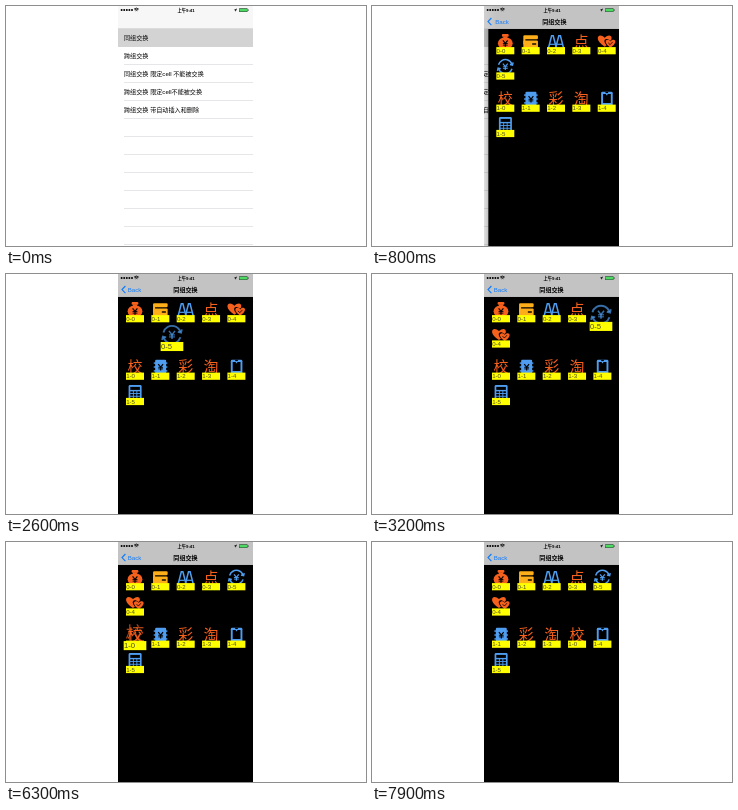
These frames come from a looping animation (360x240 px, 8 s). An HTML page with a canvas:

```html
<!DOCTYPE html>
<html lang="zh-CN">
<head>
<meta charset="utf-8">
<style>
html, body { margin: 0; width: 100%; height: 100%; overflow: hidden; background: #fff; }
canvas { display: block; width: 360px; height: 240px; }
</style>
</head>
<body>
<canvas id="stage"></canvas>
<script>
const LOOP = 8000, LEFT = 112, WIDTH = 135, NAV = 23, CELL = 18;
const ORANGE = '#f5601c', AMBER = '#fdae18', BLUE = '#4f9df0', TINT = '#0a7aff';
const FONT = '"Liberation Sans", "Noto Sans CJK SC", "Noto Sans CJK", sans-serif';
const ROWS = ['同组交换', '跨组交换', '同组交换 限定cell 不能被交换',
              '跨组交换 限定cell不能被交换', '跨组交换 带自动插入和删除'];

const canvas = document.getElementById('stage');
const c = canvas.getContext('2d');
const ratio = window.devicePixelRatio || 1;
canvas.width = 360 * ratio;
canvas.height = 240 * ratio;

const clamp = v => Math.max(0, Math.min(1, v));
const mix = (a, b, p) => a + (b - a) * p;
const ease = (t, start, length) => {
  const p = clamp((t - start) / length);
  return p * p * (3 - 2 * p);
};

function rect(x, y, w, h, color) {
  c.fillStyle = color;
  c.fillRect(x, y, w, h);
}
function round(x, y, w, h, r, color) {
  c.fillStyle = color;
  c.beginPath();
  c.roundRect(x, y, w, h, r);
  c.fill();
}
function disc(x, y, r, color) {
  c.fillStyle = color;
  c.beginPath();
  c.arc(x, y, r, 0, 7);
  c.fill();
}
function line(color, width, ...points) {
  c.strokeStyle = color;
  c.lineWidth = width;
  c.beginPath();
  points.forEach(([x, y]) => c.lineTo(x, y));
  c.stroke();
}
function arc(x, y, r, from, to, color, width) {
  c.strokeStyle = color;
  c.lineWidth = width;
  c.beginPath();
  c.arc(x, y, r, from, to);
  c.stroke();
}
function text(value, x, y, size, color, align = 'left', weight = 400) {
  c.font = `${weight} ${size}px ${FONT}`;
  c.textAlign = align;
  c.fillStyle = color;
  c.fillText(value, x, y);
}

// Icons are drawn around their centre, about 15 px wide.
const yen = (x, y, color, s = 1) => {
  line(color, 1.2, [x - 2.4 * s, y - 3 * s], [x, y], [x + 2.4 * s, y - 3 * s]);
  line(color, 1.2, [x, y], [x, y + 3.4 * s]);
  line(color, 0.9, [x - 2.4 * s, y + 0.2], [x + 2.4 * s, y + 0.2]);
  line(color, 0.9, [x - 2.4 * s, y + 1.8 * s], [x + 2.4 * s, y + 1.8 * s]);
};
const glyph = value => () => text(value, 0, 5.6, 15, ORANGE, 'center', 500);
const heart = (x, y, s, color) => {
  c.fillStyle = color;
  c.beginPath();
  c.moveTo(x, y + s);
  c.bezierCurveTo(x - 2 * s, y - 0.3 * s, x - s, y - 1.5 * s, x, y - 0.5 * s);
  c.bezierCurveTo(x + s, y - 1.5 * s, x + 2 * s, y - 0.3 * s, x, y + s);
  c.fill();
};

const icons = {
  bag() {
    round(-3.4, -7.4, 6.8, 2.8, 1, ORANGE);
    rect(-2, -5, 4, 2, ORANGE);
    c.fillStyle = ORANGE;
    c.beginPath();
    c.ellipse(0, 2, 7.4, 6, 0, 0, 7);
    c.fill();
    yen(0, 2, '#000');
  },
  card() {
    round(-7.3, -6, 14.6, 4, 1.2, AMBER);
    round(-7.3, -0.8, 14.6, 8, 1, AMBER);
    rect(-7.3, -3, 2, 6, AMBER);
    rect(1.5, 2, 4, 1.4, '#000');
  },
  letters() {
    for (const x of [-3.6, 3.6]) {
      line(BLUE, 1.5, [x - 4, 7], [x - 0.8, -5.6], [x + 0.8, -5.6], [x + 4, 7]);
      line(BLUE, 1.2, [x - 2.5, 3], [x + 2.5, 3]);
    }
  },
  hearts() {
    heart(-2, -0.5, 6, ORANGE);
    heart(3.5, 2, 5, '#000');
    heart(3.8, 2.2, 4.2, ORANGE);
    line('#000', 0.8, [1.6, 1.6], [3.4, 3.4], [6, 0.6]);
  },
  cycle() {
    arc(0, 0, 7, 3.4, 6.0, BLUE, 1.5);
    arc(0, 0, 7, 0.3, 2.85, BLUE, 1.5);
    line(BLUE, 1.5, [4.6, -2.2], [7.2, -1.6], [7.8, -4.2]);
    line(BLUE, 1.5, [-4.6, 2.2], [-7.2, 1.6], [-7.8, 4.2]);
    yen(0, 0, BLUE);
  },
  book() {
    round(-5.2, -7, 11, 14, 1.2, BLUE);
    for (const y of [-4.4, -0.5, 3.4]) rect(-6.6, y, 13.6, 1.4, BLUE);
    yen(0.3, 0.3, '#000');
  },
  tablet() {
    round(-5.6, -7, 11.6, 14.2, 1.4, BLUE);
    rect(-3.7, -4.8, 7.8, 9, '#000');
    rect(-1.2, -7, 2.6, 1.3, '#000');
    rect(-0.6, -4.8, 1.4, 1.2, BLUE);
  },
  calculator() {
    round(-6.4, -7, 13, 14.4, 1.4, BLUE);
    rect(-4.7, -5.2, 9.6, 3, '#000');
    for (let k = 0; k < 9; k++)
      rect(-4.7 + 3.5 * (k % 3), -0.8 + 2.7 * Math.floor(k / 3), 2.6, 1.8, '#000');
  },
  dot: glyph('点'), school: glyph('校'), color: glyph('彩'), wash: glyph('淘')
};

const sections = [
  ['bag', 'card', 'letters', 'dot', 'hearts', 'cycle'],
  ['school', 'book', 'color', 'wash', 'tablet', 'calculator']
];
// Cells that make room: start time and new slot.
const shifts = {
  '0-4': [2980, 5], '1-1': [6580, 0], '1-2': [6780, 1], '1-3': [7110, 2]
};
// Path points are [time, x, y] of the dragged cell's centre.
const drags = {
  '0-5': { lift: 2100, drop: 3300, slot: 4,
    path: [[2400, 129, 64.5], [2650, 175, 66], [2900, 220, 57], [3200, 229, 45.6]] },
  '1-0': { lift: 6030, drop: 7370, slot: 3,
    path: [[6450, 129, 96.8], [6750, 162, 89], [7100, 207.5, 84.8], [7370, 208, 89]] }
};

const slotCentre = (section, slot) => [
  129 + 25.35 * (slot % 5),
  39.3 + 57.5 * section + 25.3 * Math.floor(slot / 5)
];
const between = (a, b, p) => [mix(a[0], b[0], p), mix(a[1], b[1], p)];

function along(path, t) {
  let [, x, y] = path[0];
  for (let i = 1; i < path.length; i++) {
    const [start] = path[i - 1], [end, toX, toY] = path[i];
    if (t > start) [x, y] = between(path[i - 1].slice(1), [toX, toY], clamp((t - start) / (end - start)));
  }
  return [x, y];
}

function drawCell(icon, label, [x, y], scale = 1, alpha = 1) {
  c.save();
  c.translate(x, y);
  c.scale(scale, scale);
  c.save();
  c.globalAlpha = alpha;
  c.translate(0, -4);
  icons[icon]();
  c.restore();
  rect(-CELL / 2, 1.8, CELL, 7.2, '#ff0');
  text(label, -8.8, 7.6, 6.1, '#4a4a30');
  c.restore();
}

function drawGrid(t) {
  const lifted = [];
  sections.forEach((names, section) => names.forEach((icon, slot) => {
    const label = `${section}-${slot}`, home = slotCentre(section, slot);
    const drag = drags[label], shift = shifts[label];
    if (drag && t > drag.lift && t < drag.drop + 230) {
      const down = ease(t, drag.drop, 230);
      const up = ease(t, drag.lift, 220) * (1 - down);
      const spot = between(along(drag.path, t), slotCentre(section, drag.slot), down);
      if (t < drag.path[0][0]) drawCell(icon, label, home);
      lifted.push([icon, label, spot, 1 + 0.26 * up, 1 - 0.3 * up]);
    } else if (drag) {
      drawCell(icon, label, t > drag.lift ? slotCentre(section, drag.slot) : home);
    } else if (shift) {
      drawCell(icon, label, between(home, slotCentre(section, shift[1]), ease(t, shift[0], 220)));
    } else {
      drawCell(icon, label, home);
    }
  }));
  lifted.forEach(args => drawCell(...args));
}

function drawList(p) {
  c.save();
  c.translate(-0.3 * WIDTH * p, 0);
  rect(LEFT, 0, WIDTH, 240, '#fff');
  rect(LEFT, NAV, WIDTH, 18, '#d3d3d3');
  for (let k = 2; k <= 12; k++) rect(118, 22 + 18 * k, WIDTH - 6, 1, '#e6e6e8');
  ROWS.forEach((row, k) => text(row, 118, 34.3 + 18 * k, 6.12, '#000'));
  c.restore();
  rect(LEFT, NAV, WIDTH, 217, `rgba(0,0,0,${0.1 * p})`);
}

function drawNav(p, edge) {
  rect(LEFT, 0, WIDTH, NAV, '#f7f7f7');
  if (p > 0) {
    const blend = c.createLinearGradient(edge - 40, 0, edge + 8, 0);
    blend.addColorStop(0, 'rgba(195,195,195,0)');
    blend.addColorStop(1, '#c3c3c3');
    rect(LEFT, 0, WIDTH, NAV, p < 1 ? blend : '#c3c3c3');
  }
  rect(LEFT, NAV - 0.4, WIDTH, 0.4, '#b2b2b2');
  c.globalAlpha = p;
  text('同组交换', 179.5 + 90 * (1 - p), 17.8, 6.12, '#000', 'center', 700);
  line(TINT, 1.1, [119.4, 12], [116, 15.6], [119.4, 19.2]);
  text('Back', 121.8 + 45 * (1 - p), 17.8, 6.12, TINT);
  c.globalAlpha = 1;
}

function drawStatus() {
  for (let k = 0; k < 5; k++) disc(115.6 + 2.6 * k, 4, 1, '#000');
  for (const r of [1.3, 2.5, 3.6]) arc(130.4, 5.8, r, -2.3, -0.84, '#000', 0.8);
  text('上午9:41', 180, 5.6, 4.3, '#000', 'center', 700);
  c.fillStyle = '#000';
  c.beginPath();
  for (const [x, y] of [[231, 2.4], [229.6, 5.8], [229.2, 4.3], [227.8, 4]]) c.lineTo(x, y);
  c.fill();
  round(233, 2.3, 8.6, 3.6, 0.7, '#333');
  round(233.5, 2.8, 7.6, 2.6, 0.4, '#4cd964');
  rect(242, 3.4, 0.6, 1.4, '#333');
}

const spring = s => 1 - (1 + 7.9 * s) * Math.exp(-7.9 * s);

function draw(t) {
  const seconds = Math.max(0, (t - 200) / 1000);
  const p = Math.min(1, spring(seconds) / spring(0.75));
  const offset = WIDTH * (1 - p), edge = LEFT + offset;

  c.setTransform(ratio, 0, 0, ratio, 0, 0);
  rect(0, 0, 360, 240, '#fff');
  c.save();
  c.beginPath();
  c.rect(LEFT, 0, WIDTH, 240);
  c.clip();
  if (p < 1) drawList(p);
  if (p > 0) {
    const shade = c.createLinearGradient(edge - 5, 0, edge, 0);
    shade.addColorStop(0, 'rgba(0,0,0,0)');
    shade.addColorStop(1, 'rgba(0,0,0,.15)');
    rect(edge - 5, NAV, 5, 217, shade);
    rect(edge, NAV, WIDTH, 217, '#000');
    c.save();
    c.translate(offset, 0);
    drawGrid(t);
    c.restore();
  }
  drawNav(p, edge);
  drawStatus();
  c.restore();
}

const begin = performance.now();
function tick() {
  draw((performance.now() - begin) % LOOP);
  requestAnimationFrame(tick);
}
tick();
</script>
</body>
</html>
```
